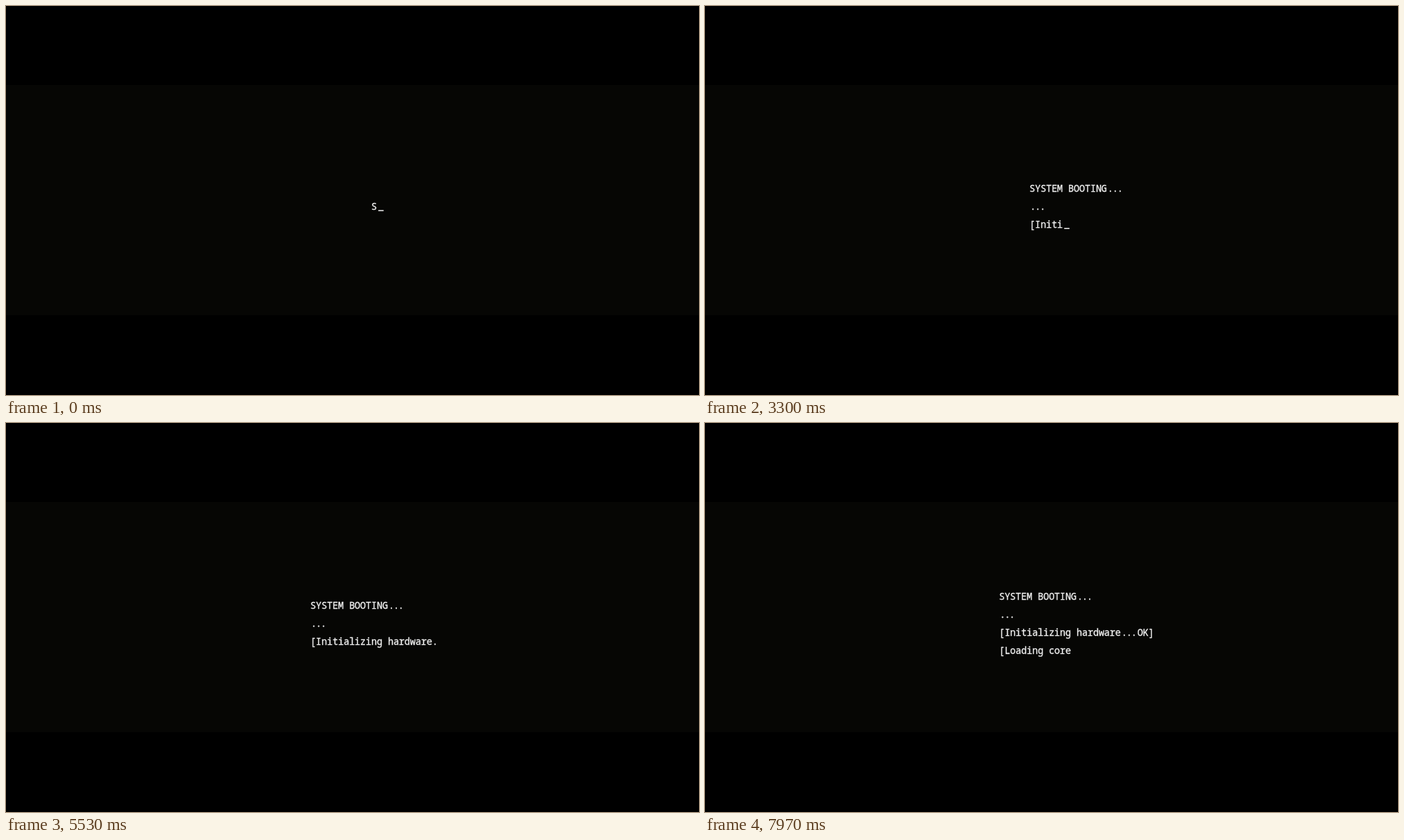
Write an HTML page that moves like this. It is 998 px wide and 561 px high and loops after 8000 ms.

```html
<!DOCTYPE html>
<html lang="en">
<head>
<meta charset="utf-8">
<title>System boot</title>
<style>
  html, body { margin: 0; width: 100%; height: 100%; overflow: hidden; background: #000; }
  .stage { position: absolute; left: 0; top: 0; width: 998px; height: 561px; overflow: hidden; background: #000; }
  .band { position: absolute; left: 0; top: 114px; width: 998px; height: 332px; background: #060604; }
  svg { position: absolute; left: 0; top: 0; }
  text {
    font: 500 13.5px "Noto Sans Mono", "DejaVu Sans Mono", monospace;
    fill: #f0f0f0; stroke: #f0f0f0; stroke-width: .35px; white-space: pre;
  }
  rect { fill: #f0f0f0; }
</style>
</head>
<body>
<div class="stage">
  <div class="band"></div>
  <svg width="998" height="561" viewBox="0 0 998 561">
    <text></text><text></text><text></text><text></text>
    <rect width="7.6" height="1.5"/>
  </svg>
</div>
<script>
const SCRIPT = "SYSTEM BOOTING...\n...\n[Initializing hardware...OK]\n[Loading core ";
const LOOP = 8000, FIRST_KEY = 28, KEY_GAP = 125.1;
const BLINK = 1300, BLINK_ON = 655, LIT = 670;
const ADVANCE = 7.97, PITCH = 25.7, CURSOR = 10;
const CX = 535, BASE = 294;

const rows = [...document.querySelectorAll("text")];
const cursor = document.querySelector("rect");
let shown = -1;

// Neighbouring dots sit a little closer together than other letters.
function letterPositions(line, left) {
  const xs = [...line].map((c, i) => left + i * ADVANCE);
  for (const run of line.matchAll(/\.+/g)) {
    const n = run[0].length;
    for (let j = 0; j < n; j++) xs[run.index + j] += (n - 1) / 2 - j;
  }
  return xs.map(x => x.toFixed(2)).join(" ");
}

function layout(count) {
  const lines = SCRIPT.slice(0, count).split("\n");
  const last = lines.length - 1;
  const widths = lines.map((l, i) => l.length * ADVANCE + (i === last ? CURSOR : 0));
  const left = CX - Math.max(...widths) / 2;
  const baseline = i => BASE + (i - last / 2) * PITCH;
  rows.forEach((row, i) => {
    const line = lines[i] || "";
    row.textContent = line;
    row.setAttribute("x", letterPositions(line, left));
    row.setAttribute("y", baseline(i).toFixed(2));
  });
  cursor.setAttribute("x", left + widths[last] - CURSOR + 2.2);
  cursor.setAttribute("y", baseline(last) + 0.3);
}

function draw(now) {
  const t = now % LOOP;
  const count = t < FIRST_KEY ? 1 : 2 + Math.floor((t - FIRST_KEY) / KEY_GAP);
  if (count !== shown) layout(shown = count);
  const lit = (t - BLINK_ON + BLINK) % BLINK < LIT;
  cursor.setAttribute("visibility", lit ? "visible" : "hidden");
}

const start = performance.now();
function tick() {
  draw(performance.now() - start);
  requestAnimationFrame(tick);
}
tick();
</script>
</body>
</html>
```
